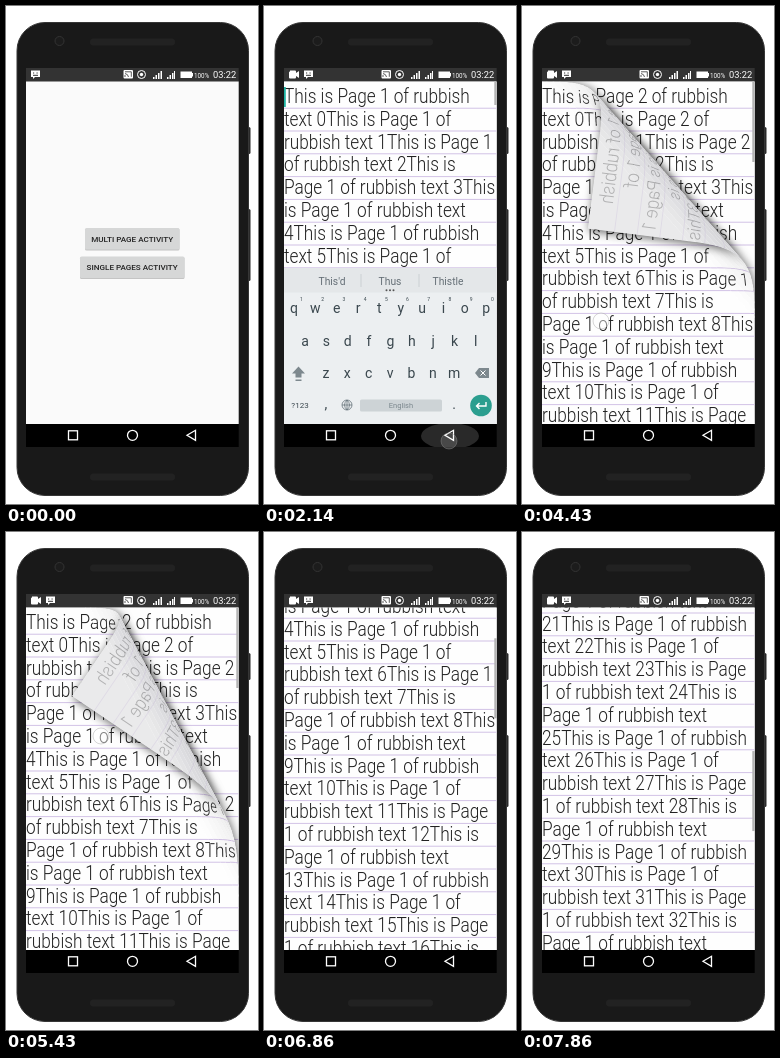
An HTML page that plays this animation: 252 by 498 pixels, repeating every 8 s.

```html
<!DOCTYPE html>
<html lang="en">
<head>
<meta charset="utf-8">
<title>Page curl on a phone</title>
<style>
html, body { margin: 0; width: 100%; height: 100%; overflow: hidden; background: #fff; }
svg { display: block; width: 252px; height: 498px; font-family: Roboto, sans-serif; }
.body { font-size: 19.5px; font-weight: 300; fill: #222; }
.button { font-size: 8.1px; font-weight: 500; fill: #222; text-anchor: middle; }
.keys text { text-anchor: middle; fill: #3a474e; }
.line { fill: none; stroke: #fff; }
#front { filter: drop-shadow(1px 1px 5px rgba(0, 0, 0, .6)); }
#back { filter: drop-shadow(1px 2px 5px rgba(0, 0, 0, .6)); }
</style>
</head>
<body>
<svg viewBox="0 0 252 498">
  <defs>
    <clipPath id="area"><rect x="20" y="75.500" width="212.700" height="342.500"/></clipPath>
    <clipPath id="navClip"><rect x="20" y="418" width="212.700" height="23"/></clipPath>
    <g id="p1" clip-path="url(#area)"></g>
    <g id="p2" clip-path="url(#area)"></g>
    <g id="clips"></g>
  </defs>

  <rect x="240" y="121" width="4.500" height="27" rx="1.500" fill="#2a2a2a"/>
  <rect x="240" y="203" width="4.500" height="72" rx="1.500" fill="#2a2a2a"/>
  <rect x="11" y="16.500" width="231.500" height="473" rx="28" fill="#191919" stroke="#363636"/>
  <circle cx="53.500" cy="35" r="4.500" fill="#1c1c1c" stroke="#333"/>
  <rect x="84" y="32.500" width="85" height="7" rx="3.500" fill="#222"/>
  <rect x="84" y="467.500" width="85" height="7" rx="3.500" fill="#222"/>

  <rect x="20" y="62" width="212.700" height="14" fill="#333"/>
  <g fill="#fff">
    <path id="camera" d="M26 64.500h5q1 0 1 1v1.500l3-2v7l-3-2v1.500q0 1-1 1h-5q-1 0-1-1v-5q0-1 1-1z"/>
    <g id="chat">
      <path d="M25 64.500h9v6.500h-5l-2 2v-2h-2z"/>
      <path d="M27 67h1.200M30.500 67h1.200M27 69.300h5" stroke="#333" fill="none"/>
    </g>
    <rect x="117.500" y="64" width="9.500" height="8.500" rx="1"/>
    <path d="M119 71v-2M119 67.500q3 .5 3.500 3.500M119 65.800h6.300v5" stroke="#333" stroke-width=".8" fill="none"/>
    <circle class="line" cx="135.500" cy="68.500" r="4"/><circle cx="135.500" cy="68.500" r="1.700"/>
    <path d="M147 73v-2h1.500v2zM149.500 73v-4h1.500v4zM152 73v-6h1.500v6zM154.500 73v-8h1.500v8z"/>
    <path d="M161 73v-2h1.500v2zM163.500 73v-4h1.500v4zM166 73v-6h1.500v6zM168 73v-8h1v8z"/>
    <path d="M174.500 65.500h11.500v1.500h1v3.500h-1v1.500h-11.500z"/>
    <text x="188" y="71.500" font-size="6.300">100%</text>
    <text x="207" y="72.300" font-size="9.300">03:22</text>
  </g>

  <g id="menu">
    <rect x="20" y="75.500" width="212.700" height="342.500" fill="#fafafa"/>
    <rect x="79" y="222.500" width="94.500" height="22" rx="1.500" fill="#c4c4c4"/>
    <rect id="multi" x="79" y="222" width="94.500" height="21.500" rx="1.500" fill="#d6d7d7"/>
    <rect x="74" y="251" width="104.500" height="22" rx="1.500" fill="#c4c4c4"/>
    <rect x="74" y="250.500" width="104.500" height="21.500" rx="1.500" fill="#d6d7d7"/>
    <text class="button" x="126.200" y="236">MULTI PAGE ACTIVITY</text>
    <text class="button" x="126.200" y="264.300">SINGLE PAGES ACTIVITY</text>
  </g>

  <rect x="20" y="418" width="212.700" height="23"/>
  <ellipse id="press" cx="186" cy="430" rx="29" ry="13" fill="#292929" clip-path="url(#navClip)"/>
  <g class="line" stroke-width="1.300">
    <rect x="62.500" y="424.800" width="9" height="9"/>
    <circle cx="126.500" cy="429.300" r="5"/>
    <path d="M189.500 424.300v10l-8.500-5z"/>
  </g>

  <g id="view">
    <use id="flat" href="#p1"/>
    <g id="curl" clip-path="url(#area)">
      <use href="#p2"/>
      <g id="front"></g>
      <g id="back"></g>
    </g>
    <rect id="caret" x="20" y="81" width="1.800" height="20" fill="#1fb5a5"/>
    <rect id="bar" x="230.300" width="2.400" fill="#b4b4b4"/>
  </g>
  <g clip-path="url(#area)"><g id="keyboard" class="keys"></g></g>
  <circle id="touch" r="8" fill="#fff" fill-opacity=".45" stroke="#999" stroke-opacity=".4"/>
</svg>
<script>
const $ = id => document.getElementById(id);
const set = (node, attrs) => {
  for (const name in attrs) node.setAttribute(name, attrs[name]);
  return node;
};
const add = (parent, tag, attrs, text) => {
  const node = set(document.createElementNS('http://www.w3.org/2000/svg', tag), attrs);
  if (text) node.textContent = text;
  return parent.appendChild(node);
};
const show = (id, on) => { $(id).style.display = on ? '' : 'none'; };

const LEFT = 20, TOP = 75.5, WIDTH = 212.7, HEIGHT = 342.5, RIGHT = LEFT + WIDTH;
const PITCH = 22.8, STEP = 1000 / 7, LOOP = 8000;

// Text pages

function wrap(text, limit) {
  const lines = [''];
  for (const word of text.split(' ')) {
    const last = lines[lines.length - 1];
    if (!last) lines[lines.length - 1] = word;
    else if (last.length + 1 + word.length > limit) lines.push(word);
    else lines[lines.length - 1] = last + ' ' + word;
  }
  return lines;
}

function buildPage(id, number) {
  const page = $(id);
  add(page, 'rect', { x: LEFT, y: TOP, width: WIDTH, height: HEIGHT, fill: '#fefefe' });
  const roll = add(page, 'g', {});
  let text = '';
  for (let i = 0; i < 36; i++) text += `This is Page ${number} of rubbish text ${i}`;
  wrap(text, 28).forEach((line, i) => {
    const y = 97 + i * PITCH;
    add(roll, 'rect', { x: LEFT, y: y + 4.7, width: WIDTH, height: 1, fill: '#d2c2e6' });
    add(roll, 'text', { class: 'body', transform: `translate(${LEFT} ${y}) scale(.885 1)` }, line);
  });
  return roll;
}
const roll = buildPage('p1', 1);
buildPage('p2', 2);

// Keyboard

function buildKeyboard() {
  const board = $('keyboard');
  const label = (text, x, y, size, fill) =>
    add(board, 'text', { x, y, 'font-size': size, style: fill ? `fill:${fill}` : '' }, text);
  add(board, 'rect', { x: LEFT, y: 262, width: WIDTH, height: 156, fill: '#eceff1' });
  add(board, 'rect', { x: LEFT, y: 262, width: WIDTH, height: 24.5, fill: '#e4e7e9' });
  add(board, 'path', { d: 'M97 268v13M155 268v13', stroke: '#cbd0d3' });
  ["This'd", 'Thus', 'Thistle'].forEach((word, i) => label(word, 68 + i * 58, 278.5, 10.3, '#667077'));
  for (let i = -1; i < 2; i++) add(board, 'circle', { cx: 126 + i * 3.5, cy: 284.3, r: 1, fill: '#555' });
  [['qwertyuiop', 30, 307], ['asdfghjkl', 41, 339.5], ['zxcvbnm', 62, 371.5]].forEach(([row, x, y]) =>
    [...row].forEach((key, i) => label(key, x + i * 21.35, y, 14)));
  [...'1234567890'].forEach((n, i) => label(n, 37.5 + i * 21.2, 295, 5));
  add(board, 'path', { d: 'M34.500 360.500l6.500 7h-3.500v4h-6v-4H28zM31.500 373.500h6v1.500h-6z', fill: '#7d888e' });
  add(board, 'path', { d: 'M211 367l4-5h10v10h-10z', fill: '#7d888e' });
  add(board, 'path', { d: 'M216.500 364.500l5 5m0-5l-5 5', stroke: '#fff' });
  label('?123', 36, 402, 8);
  label(',', 62, 403, 14);
  label('.', 190, 403, 14);
  add(board, 'path', {
    d: 'M78 399a5 5 0 1 0 10 0a5 5 0 1 0-10 0zM78 399h10M83 394v10M83 394q-5 5 0 10q5-5 0-10',
    fill: 'none', stroke: '#66737a', 'stroke-width': .8
  });
  add(board, 'rect', { x: 96, y: 393.5, width: 82, height: 12, rx: 1.5, fill: '#cdd3d6' });
  label('English', 137, 402.3, 7.5, '#7c888e');
  add(board, 'circle', { cx: 217, cy: 399.5, r: 10.8, fill: '#2b9e8f' });
  add(board, 'path', {
    d: 'M222 396v4h-9.500m3-3l-3 3l3 3', fill: 'none', stroke: '#fff', 'stroke-width': 1.4
  });
}
buildKeyboard();

// Page curl: the sheet wraps round a cylinder, cut into strips

const BANDS = 18;
const strips = Array.from({ length: BANDS + 2 }, (_, i) => {
  const isBack = i > BANDS / 2;
  const clip = add(add($('clips'), 'clipPath', { id: 'strip' + i }), 'path', {});
  const group = add($(isBack ? 'back' : 'front'), 'g', {});
  const sheet = add(group, 'g', { 'clip-path': `url(#strip${i})` });
  add(sheet, 'use', { href: '#p1' });
  const turn = (i - .5) / BANDS;
  const light = isBack ? 76 + 14 * Math.min(1, 2 * turn - 1) : 0;
  const opacity = isBack ? .74 : i ? .16 * turn : 0;
  add(sheet, 'rect', {
    x: LEFT, y: TOP, width: WIDTH, height: HEIGHT, fill: `hsl(240 3% ${light}%)`, opacity
  });
  return { clip, group };
});

function drawCurl(tipX, tipY, radius) {
  const dx = RIGHT - tipX, dy = TOP - tipY, dist = Math.hypot(dx, dy);
  const ex = dx / dist, ey = dy / dist;
  const r = Math.min(radius, dist / Math.PI), arc = Math.PI * r;
  const corner = RIGHT * ex + TOP * ey;
  const start = corner - (dist + arc) / 2;
  const point = (u, v) => `${u * ex - v * ey} ${u * ey + v * ex}`;

  strips.forEach(({ clip, group }, i) => {
    let from = start + (i - 1) * arc / BANDS, to = from + arc / BANDS;
    let scale = 1, shift = 0;
    if (i === 0) {
      from = start - 900;
      to = start;
    } else if (i > BANDS) {
      to = from + 900;
      scale = -1;
      shift = 2 * start + arc;
    } else {
      const a = r * Math.sin((i - 1) * Math.PI / BANDS), b = r * Math.sin(i * Math.PI / BANDS);
      scale = (b - a) / (to - from);
      shift = start + a - scale * from;
    }
    from -= .5;
    to += .5;
    set(clip, { d: `M${point(from, -900)}L${point(to, -900)}L${point(to, 900)}L${point(from, 900)}Z` });
    const m = scale - 1;
    set(group, {
      transform: `matrix(${[1 + m * ex * ex, m * ex * ey, m * ex * ey, 1 + m * ey * ey, shift * ex, shift * ey]})`
    });
  });
}

// Tracks: [step, values...]

const tipTrack = [[19, 231, 77, 10], [25, 66, 202, 29], [29, 54, 245, 29], [33, 78, 200, 28],
  [38, 66, 164, 26], [41, 110, 145, 26], [43, 230, 78, 10]];
const touchTrack = [[19, 224, 300], [25, 92, 284], [29, 60, 370], [33, 98, 260], [38, 95, 204], [41, 138, 205]];
const scrollTrack = [[44, 0], [46, 40], [48, 130], [50, 260], [52, 425], [55, 614]];
const enterTrack = [[6, 40, .3], [7, 22, .6], [8, 10, .88], [9, 4.5, .98], [10, 0, 1]];
const boardTrack = [[10, 156], [11, 60], [12, 0], [15, 0], [17, 156]];

function sample(track, k) {
  const next = track.findIndex(key => key[0] > k);
  if (next < 0) return track[track.length - 1].slice(1);
  if (next === 0) return track[0].slice(1);
  const a = track[next - 1], b = track[next], f = (k - a[0]) / (b[0] - a[0]);
  return a.slice(1).map((value, i) => value + (b[i + 1] - value) * f);
}

function draw(k) {
  const recording = k >= 5, curling = k >= 19 && k < 43;
  show('camera', recording);
  set($('chat'), { transform: `translate(${recording ? 15 : 0} 0)` });
  set($('multi'), { fill: k >= 3 && k < 7 ? '#c3c4c4' : '#d6d7d7' });

  const [drop, opacity] = sample(enterTrack, k);
  show('view', k >= 6);
  set($('view'), { transform: `translate(0 ${drop})`, opacity });

  const [lower] = sample(boardTrack, k);
  show('keyboard', lower < 156);
  set($('keyboard'), { transform: `translate(0 ${lower})` });
  show('press', k >= 14 && k < 17);
  show('caret', k < 18);

  const [scroll] = sample(scrollTrack, k);
  set(roll, { transform: `translate(0 ${-scroll})` });
  set($('bar'), { y: 76 + scroll * .233, height: lower < 100 ? 23 : 80 });

  show('flat', !curling);
  show('curl', curling);
  if (curling) drawCurl(...sample(tipTrack, k));

  const pressing = k >= 14 && k < 16;
  const [x, y] = pressing ? [185, 435] : k < 6 ? [126, 233] : sample(touchTrack, k);
  show('touch', pressing || (k >= 3 && k < 5) || (k >= 19 && k < 42));
  set($('touch'), { cx: x, cy: y, 'fill-opacity': pressing ? .15 : .45 });
}

let shown = -1;
function tick() {
  const k = Math.floor(performance.now() % LOOP / STEP + .05);
  if (k !== shown) draw(shown = k);
  requestAnimationFrame(tick);
}
tick();
</script>
</body>
</html>
```
